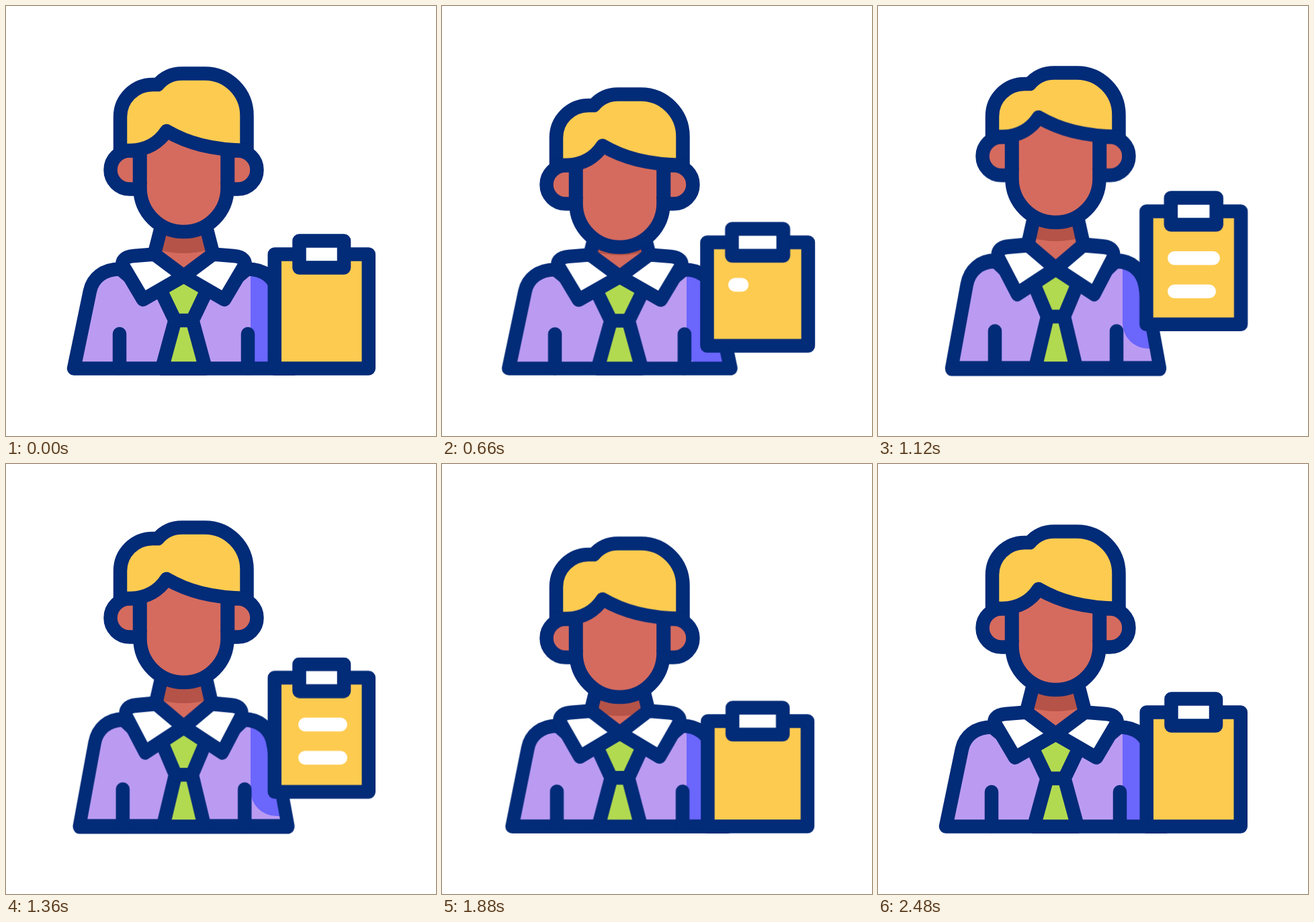
An HTML page without scripts for the animation above (2.84 s loop, 640x640 px).

```html
<!DOCTYPE html>
<html lang="en">
<head>
<meta charset="utf-8">
<title>Clerk with clipboard</title>
<style>
  html, body { margin: 0; width: 100%; height: 100%; overflow: hidden; background: #fff; }
  svg { display: block; width: 100%; height: 100%; }

  .ink { stroke: #022b78; stroke-width: 20.5; stroke-linecap: round; stroke-linejoin: round; }
  .ink * { vector-effect: non-scaling-stroke; }
  .flat { stroke-linecap: butt; }
  .none { fill: none; }
  .skin { fill: #d56b5e; }
  .dusk { fill: #b55348; }
  .gold { fill: #fdcb50; }
  .coat { fill: #bb9bf2; }
  .tie { fill: #b2da50; }
  .white { fill: #fff; }
  .cast { fill: #6b66fc; }

  .body, .hair, .brow, .chin, .dusk, .pad, .board, .clip, .cast, .row1, .row2 {
    animation: 2840ms linear infinite;
  }
  .body { animation-name: body; transform-origin: 264.5px 539.5px; }
  .hair { animation-name: hair; }
  .brow { animation-name: brow; }
  .chin { animation-name: chin; }
  .dusk { animation-name: dusk; }
  .pad { animation-name: pad; }
  .board { animation-name: board; transform-origin: 469.75px 369.5px; }
  .clip { animation-name: clip; transform-origin: 469.75px 369.5px; }
  .cast { animation-name: cast; }
  .row1 { animation-name: row1; }
  .row2 { animation-name: row2; }

  @keyframes body {
    0%, 7.04% { transform: scale(1, 1); animation-timing-function: ease-in; }
    11.97% { transform: scale(1.07, .914); animation-timing-function: ease-out; }
    14.08% { transform: scale(1.082, .9); animation-timing-function: ease-in; }
    23.24% { transform: scale(1.01, .995); animation-timing-function: ease-out; }
    39.44% { transform: scale(.948, 1.082); animation-timing-function: ease-in-out; }
    49.3% { transform: scale(.95, 1.076); animation-timing-function: ease-in; }
    55.63% { transform: scale(1.015, .993); animation-timing-function: ease-out; }
    59.5% { transform: scale(1.068, .915); animation-timing-function: ease-in; }
    66.2% { transform: scale(.98, 1.012); animation-timing-function: ease-out; }
    69.7% { transform: scale(.966, 1.04); animation-timing-function: ease-in-out; }
    83.1%, 100% { transform: scale(1, 1); }
  }
  @keyframes hair {
    0%, 7.04% { transform: translateY(0); animation-timing-function: ease-in; }
    11.97% { transform: translateY(35px); animation-timing-function: ease-out; }
    14.5% { transform: translateY(41px); animation-timing-function: ease-in; }
    23.24% { transform: translateY(31px); animation-timing-function: ease-out; }
    39.44% { transform: translateY(-1px); animation-timing-function: ease-in-out; }
    48% { transform: translateY(-6px); animation-timing-function: ease-in; }
    55.63% { transform: translateY(17px); animation-timing-function: ease-out; }
    60% { transform: translateY(39px); animation-timing-function: ease-in; }
    66.2% { transform: translateY(18px); animation-timing-function: ease-out; }
    71% { transform: translateY(-5px); animation-timing-function: ease-in-out; }
    87.3%, 100% { transform: translateY(0); }
  }
  @keyframes brow {
    0%, 7.04% { transform: translateY(0); animation-timing-function: ease-in; }
    11.97% { transform: translateY(37.5px); animation-timing-function: ease-out; }
    14.08% { transform: translateY(43px); animation-timing-function: ease-in; }
    23.24% { transform: translateY(22px); animation-timing-function: ease-out; }
    39.44% { transform: translateY(-20.5px); animation-timing-function: ease-in-out; }
    48% { transform: translateY(-15px); animation-timing-function: ease-in; }
    55.63% { transform: translateY(6.5px); animation-timing-function: ease-out; }
    60% { transform: translateY(38px); animation-timing-function: ease-in; }
    66.2% { transform: translateY(15.5px); animation-timing-function: ease-out; }
    71% { transform: translateY(-6px); animation-timing-function: ease-in-out; }
    87.3%, 100% { transform: translateY(0); }
  }
  @keyframes chin {
    0%, 7.04% { transform: translateY(0); animation-timing-function: ease-in; }
    11.97% { transform: translateY(31px); animation-timing-function: ease-out; }
    14.08% { transform: translateY(36px); animation-timing-function: ease-in; }
    23.24% { transform: translateY(23px); animation-timing-function: ease-out; }
    39.44% { transform: translateY(-14px); animation-timing-function: ease-in-out; }
    48% { transform: translateY(-11px); animation-timing-function: ease-in; }
    55.63% { transform: translateY(5px); animation-timing-function: ease-out; }
    60% { transform: translateY(31px); animation-timing-function: ease-in; }
    66.2% { transform: translateY(11px); animation-timing-function: ease-out; }
    71% { transform: translateY(-5px); animation-timing-function: ease-in-out; }
    87.3%, 100% { transform: translateY(0); }
  }
  @keyframes dusk {
    0%, 7.04% { transform: translateY(0); animation-timing-function: ease-in; }
    11.97% { transform: translateY(40px); animation-timing-function: ease-out; }
    14.08% { transform: translateY(44px); animation-timing-function: ease-in; }
    23.24% { transform: translateY(3px); animation-timing-function: ease-out; }
    39.44% { transform: translateY(-18px); animation-timing-function: ease-in-out; }
    48% { transform: translateY(-12px); animation-timing-function: ease-in; }
    55.63% { transform: translateY(11px); animation-timing-function: ease-out; }
    60% { transform: translateY(38px); animation-timing-function: ease-in; }
    66.2% { transform: translateY(7px); animation-timing-function: ease-out; }
    71% { transform: translateY(-5px); animation-timing-function: ease-in-out; }
    87.3%, 100% { transform: translateY(0); }
  }

  /* clipboard: crouch, hop, hover, land */
  @keyframes pad {
    0%, 15% { transform: translateY(0); animation-timing-function: ease-in-out; }
    20.4% { transform: translateY(22px); animation-timing-function: ease-in; }
    23.24% { transform: translateY(-17.5px); animation-timing-function: ease-out; }
    34% { transform: translateY(-70px); animation-timing-function: ease-in-out; }
    39.44% { transform: translateY(-64px); animation-timing-function: ease-in-out; }
    47%, 55.63% { transform: translateY(-51.5px); animation-timing-function: ease-in; }
    63% { transform: translateY(4px); animation-timing-function: ease-out; }
    64.4% { transform: translateY(22px); animation-timing-function: ease-in-out; }
    66.2% { transform: translateY(13.5px); animation-timing-function: ease-out; }
    70% { transform: translateY(-4px); animation-timing-function: ease-in-out; }
    76%, 100% { transform: translateY(0); }
  }
  @keyframes board {
    0%, 15% { transform: scale(1, 1); animation-timing-function: ease-in-out; }
    20.4% { transform: scale(1.1, .87); animation-timing-function: ease-in; }
    23.24% { transform: scale(1.075, .906); animation-timing-function: ease-out; }
    34% { transform: scale(1.012, .98); }
    39.44% { transform: scale(1.005, .99); }
    47%, 61% { transform: scale(1, 1); animation-timing-function: ease-in; }
    63% { transform: scale(1.03, .976); animation-timing-function: ease-out; }
    64.4% { transform: scale(1.1, .87); animation-timing-function: ease-in-out; }
    66.2% { transform: scale(1.062, .92); animation-timing-function: ease-out; }
    70% { transform: scale(.985, 1.024); animation-timing-function: ease-in-out; }
    76%, 100% { transform: scale(1, 1); }
  }
  @keyframes clip {
    0%, 15% { transform: scaleX(1); animation-timing-function: ease-in-out; }
    20.4% { transform: scaleX(1.2); animation-timing-function: ease-in; }
    23.24% { transform: scaleX(1.15); animation-timing-function: ease-out; }
    34% { transform: scaleX(1.03); }
    39.44% { transform: scaleX(1.02); }
    47%, 61% { transform: scaleX(1); animation-timing-function: ease-in; }
    63% { transform: scaleX(1.06); animation-timing-function: ease-out; }
    64.4% { transform: scaleX(1.2); animation-timing-function: ease-in-out; }
    66.2% { transform: scaleX(1.13); animation-timing-function: ease-out; }
    70% { transform: scaleX(.97); animation-timing-function: ease-in-out; }
    76%, 100% { transform: scaleX(1); }
  }
  @keyframes cast {
    0%, 20.4% { transform: translateY(0); animation-timing-function: ease-in; }
    23.24% { transform: translateY(-33px); animation-timing-function: ease-out; }
    34% { transform: translateY(-73px); animation-timing-function: ease-in-out; }
    39.44% { transform: translateY(-66px); animation-timing-function: ease-in-out; }
    47%, 55.63% { transform: translateY(-52px); animation-timing-function: ease-in; }
    63%, 100% { transform: translateY(0); }
  }
  @keyframes row1 {
    0%, 21% { x: 426px; y: 424px; width: 0; }
    23.24% { x: 426px; y: 422.5px; width: 30px; animation-timing-function: ease-out; }
    32% { x: 428px; y: 429px; width: 80px; animation-timing-function: ease-in-out; }
    39.44% { x: 431px; y: 429px; width: 78px; animation-timing-function: ease-in-out; }
    47%, 56% { x: 435px; y: 429px; width: 73px; animation-timing-function: ease-in; }
    62.3%, 100% { x: 435px; y: 429px; width: 0; }
  }
  @keyframes row2 {
    0%, 27% { x: 426px; width: 0; }
    29.5% { x: 426px; width: 30px; animation-timing-function: ease-out; }
    39.44% { x: 431px; width: 72px; animation-timing-function: ease-in-out; }
    47%, 56% { x: 435px; width: 73px; animation-timing-function: ease-in; }
    61.5%, 100% { x: 435px; width: 0; }
  }
</style>
</head>
<body>
<svg viewBox="0 0 640 640">
  <defs>
    <path id="coat" d="M101 539.5L125 424C129 405 145 391.5 170 391.5L204 420L264.5 402L325 420L359 391.5C384 391.5 400 405 404 424L428 539.5Z"/>
    <clipPath id="inside">
      <path class="body" d="M101 539.5L125 424C129 405 145 391.5 170 391.5L204 420L264.5 402L325 420L359 391.5C384 391.5 400 405 404 424L428 539.5Z"/>
    </clipPath>
    <path id="collar" d="M264.5 402L221 369.5L190 372C176 373 171 380 175 388L204 437Z"/>
    <path id="ear" d="M199 215.5H184a28.5 28.5 0 0 0 0 57H199Z"/>
  </defs>

  <!-- neck and coat -->
  <path class="body skin" d="M232 325L221 368L264.5 402L308 368L297 325Z"/>
  <path class="dusk" d="M224 318H305V362Q264.5 374 224 362Z"/>
  <g class="body ink none">
    <path d="M232 325L221 368M297 325L308 368"/>
  </g>
  <use href="#coat" class="body coat"/>
  <g clip-path="url(#inside)">
    <rect class="cast" x="364" y="250" width="140" height="326" rx="38"/>
  </g>
  <g class="body ink">
    <use href="#coat" class="none"/>
    <path class="none" d="M169 488V539M360 488V539"/>
    <path class="tie" d="M264.5 402L229 421L251.5 468L232 539.5H297L277.5 468L300 421Z"/>
    <path d="M251.5 468H277.5"/>
    <use href="#collar" class="white"/>
    <use href="#collar" class="white" transform="matrix(-1 0 0 1 529 0)"/>
  </g>

  <!-- head -->
  <g class="ink">
    <path class="hair gold flat" d="M170 222V165A48 48 0 0 1 218 117H226Q240 100.500 262 100.500H296A62.500 62.500 0 0 1 358.500 163V222"/>
    <g class="brow skin">
      <use href="#ear"/>
      <use href="#ear" transform="matrix(-1 0 0 1 529 0)"/>
    </g>
    <path class="chin skin flat" d="M199.500 245V271a65 65 0 0 0 130 0V245"/>
    <g class="brow">
      <path class="skin" stroke="none" d="M199.500 214C215 210 230 201 239 186C270 204 300 213 329.500 214V262H199.500Z"/>
      <path class="none flat" d="M199.500 214V265M329.500 214V265"/>
      <path class="none" d="M170 215H186C210 214 228 203 239 186C270 204 305 214 358.500 215"/>
    </g>
  </g>

  <!-- clipboard -->
  <g class="pad">
    <g class="ink">
      <rect class="board gold" x="399.750" y="369.500" width="140" height="170"/>
      <rect class="clip white" x="436.500" y="349.500" width="66.500" height="40"/>
    </g>
    <rect class="row1 white" x="435" y="429" width="0" height="20.500" rx="10.250"/>
    <rect class="row2 white" x="435" y="478.500" width="0" height="20.500" rx="10.250"/>
  </g>
</svg>
</body>
</html>
```
